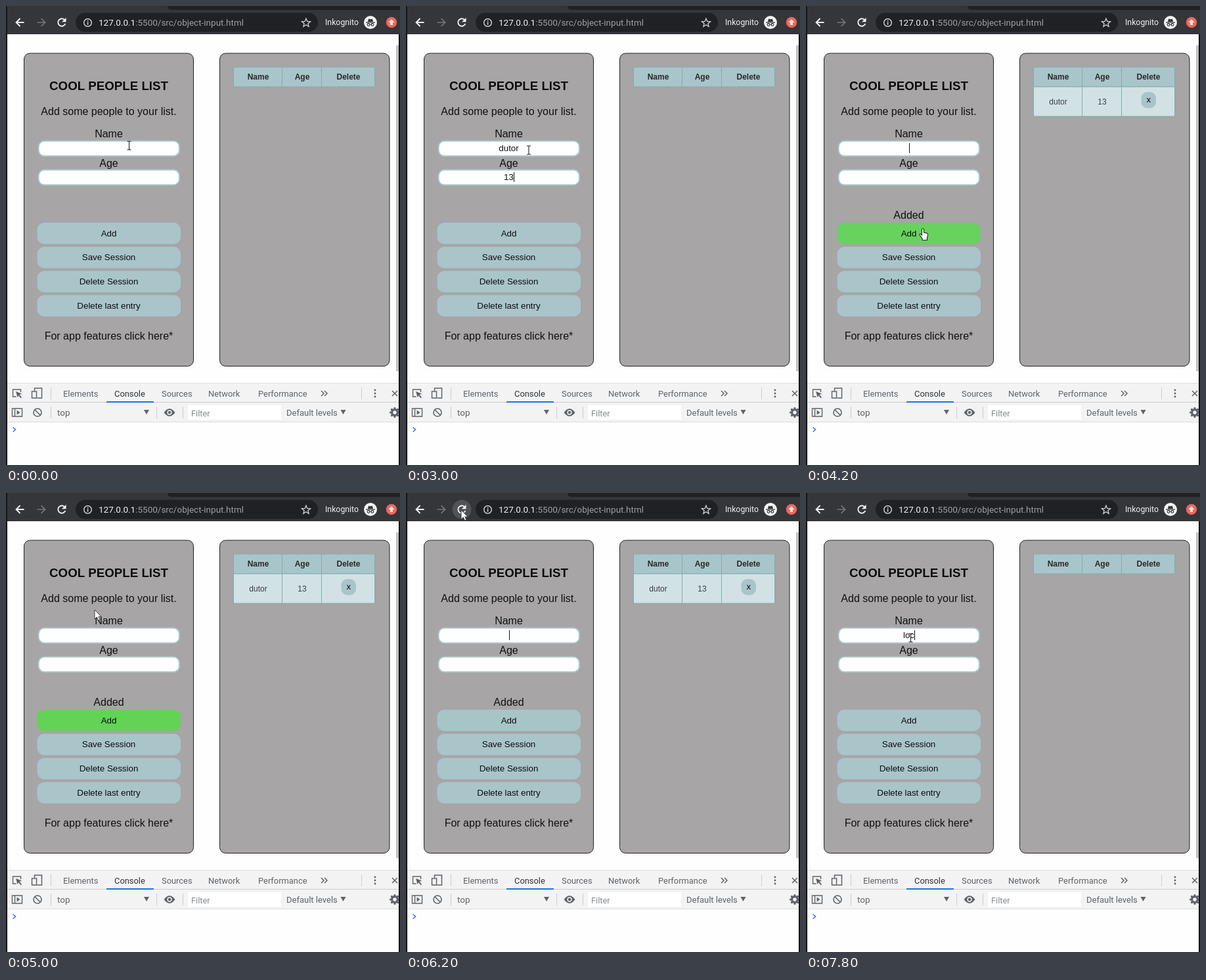
Recreate the animation shown at these times as an HTML page with a canvas. Size 600 by 699 pixels, loop 8 s.

```html
<!DOCTYPE html>
<html lang="en">
<head>
<meta charset="utf-8">
<title>Cool people list</title>
<style>
  html, body { margin: 0; width: 100%; height: 100%; overflow: hidden; background: #fefefe; }
  canvas { display: block; }
</style>
</head>
<body>
<canvas id="stage" width="600" height="699"></canvas>
<script>
const ctx = document.getElementById("stage").getContext("2d");
const LOOP = 8000, STEP = 200;
const PAGE = '"Liberation Sans", Arial, sans-serif';
const UI = "Roboto, sans-serif";
const TEAL = [169, 197, 202], GREEN = [76, 215, 50];
const PERSON = "dutor";
const ADD_AT = 4200, RELOAD_AT = 6600;
const HOVER_IN = 3400, HOVER_OUT = 4800, FADE = 1600;

// Input events: time, field, text after the event
const events = [
  [400, "name", ""],
  ...[...PERSON].map((c, i) => [800 + i * 200, "name", PERSON.slice(0, i + 1)]),
  [2400, "age", ""], [2600, "age", "1"], [2800, "age", "13"],
  [ADD_AT, "name", ""], [RELOAD_AT, "", ""], [7000, "name", ""],
  [7400, "name", "l"], [7600, "name", "lo"], [7800, "name", "loc"]
];

// Pointer path: time, x, y
const path = [
  [0, 187, 212], [2900, 187, 212], [3600, 178, 339], [4600, 178, 339],
  [5000, 135, 178], [5200, 126, 160], [6000, 84, 26], [6400, 84, 26],
  [6900, 159, 220], [LOOP, 159, 220]
];

const rgb = c => `rgb(${c.map(Math.round).join()})`;
const mix = (a, b, k) => a.map((v, i) => v + (b[i] - v) * k);
const clamp = v => Math.max(0, Math.min(1, v));
const easeOut = p => 1 - Math.pow(1 - clamp(p), 1.8);

function rect(x, y, w, h, fill) {
  ctx.fillStyle = fill;
  ctx.fillRect(x, y, w, h);
}

function box(x, y, w, h, r, fill, stroke, line = 1) {
  ctx.beginPath();
  ctx.roundRect(x, y, w, h, r);
  ctx.fillStyle = fill;
  ctx.fill();
  if (!stroke) return;
  ctx.strokeStyle = stroke;
  ctx.lineWidth = line;
  ctx.stroke();
}

function disc(x, y, r, fill) {
  ctx.beginPath();
  ctx.arc(x, y, r, 0, Math.PI * 2);
  ctx.fillStyle = fill;
  ctx.fill();
}

function ring(x, y, r, color, line, from = 0, to = Math.PI * 2) {
  ctx.beginPath();
  ctx.arc(x, y, r, from, to);
  ctx.strokeStyle = color;
  ctx.lineWidth = line;
  ctx.stroke();
}

function label(s, x, y, size, color = "#111", align = "center", family = PAGE, weight = "") {
  ctx.font = `${weight} ${size}px ${family}`;
  ctx.textAlign = align;
  ctx.fillStyle = color;
  ctx.fillText(s, x, y);
  return ctx.measureText(s).width;
}

const uiText = (s, x, y, size, color) => label(s, x, y, size, color, "left", UI);

function shape(d, x, y, fill, stroke, line = 1) {
  const p = new Path2D(d);
  ctx.save();
  ctx.translate(x, y);
  ctx.lineWidth = line;
  if (fill) { ctx.fillStyle = fill; ctx.fill(p); }
  if (stroke) { ctx.strokeStyle = stroke; ctx.stroke(p); }
  ctx.restore();
}

function pointerAt(t) {
  const i = path.findIndex((p, n) => n && t <= p[0]);
  const [t0, x0, y0] = path[i - 1], [t1, x1, y1] = path[i];
  const p = (t - t0) / (t1 - t0), k = p * p * (3 - 2 * p);
  return [x0 + (x1 - x0) * k, y0 + (y1 - y0) * k];
}

function formAt(t) {
  const form = { name: "", age: "", focus: "", caret: false };
  for (const [at, field, text] of events) {
    if (at > t) break;
    if (at === ADD_AT || at === RELOAD_AT) form.name = form.age = "";
    if (field) form[field] = text;
    form.focus = field;
    form.caret = field !== "" && (t - at) % 1000 < 500;
  }
  return form;
}

function drawToolbar(reloadHover) {
  rect(0, 0, 600, 43, "#35363a");
  box(246, -8, 360, 14, 6, "#202124");
  if (reloadHover) disc(85, 25, 14.5, "#515256");
  box(106, 10.5, 369, 29, 14.5, "#202124");
  shape("M6 -6L0 0L6 6M0 0H12", 15.5, 25, null, "#f1f1f1", 1.9);
  shape("M-6 -6L0 0L-6 6M0 0H-12", 59.5, 25, null, "#77787b", 1.7);
  ring(85, 25, 5.7, "#f1f1f1", 1.9, 0.35, 5.5);
  shape("M0 0V-6.5L-6.5 0Z", 91.5, 24.2, "#f1f1f1");
  ring(124.5, 25.3, 5.8, "#d5d6d8", 1.4);
  rect(123.8, 24.4, 1.5, 4.3, "#d5d6d8");
  rect(123.8, 21.8, 1.5, 1.5, "#d5d6d8");
  const w = uiText("127.0.0.1", 141, 30, 13.5, "#f1f2f3");
  uiText(":5500/src/object-input.html", 141 + w, 30, 13.5, "#9aa0a6");
  shape("M0 -6.5L1.8 -2.1L6.5 -1.8L2.9 1.2L4.1 5.8L0 3.3L-4.1 5.8L-2.9 1.2L-6.5 -1.8L-1.8 -2.1Z",
    457, 25.5, null, "#d5d6d8", 1.3);
  uiText("Inkognito", 486, 29, 12.3, "#f1f2f3");
  disc(555, 25, 10, "#f3f3f4");
  shape("M-7 -0.5H7V0.8H-7ZM-4.2 -1L-2.8 -5.5L0 -4.8L2.8 -5.5L4.2 -1Z", 555, 25, "#35363a");
  for (const x of [552, 558]) ring(x, 28.5, 1.8, "#35363a", 1.2);
  rect(554, 27.8, 2, 1, "#35363a");
  disc(587, 25, 8.2, "#ee675c");
  shape("M0 -5L4.6 0H2V4H-2V0H-4.6Z", 587, 25, "#fbe3e0");
}

function drawForm(t, form) {
  box(27.5, 72, 258, 476.5, 9, "#a7a5a6", "#232323");
  label("COOL PEOPLE LIST", 156.5, 128, 18.72, "#0c0c0c", "center", PAGE, "bold");
  label("Add some people to your list.", 156.5, 165.5, 16);
  label("Name", 156.5, 199.5, 16);
  label("Age", 156.5, 244.5, 16);

  [["name", 205.5], ["age", 249.5]].forEach(([field, y]) => {
    box(49.5, y, 214.5, 23, 9, "#fff", rgb(TEAL), 2);
    const w = label(form[field], 156.5, y + 15, 13.33);
    if (form.caret && form.focus === field) rect(Math.round(156.5 + w / 2), y + 3.5, 1, 15, "#111");
  });

  if (t >= ADD_AT && t < RELOAD_AT) label("Added", 156.5, 323.5, 16);
  const heat = easeOut((Math.min(t, HOVER_OUT) - HOVER_IN) / FADE) * (1 - easeOut((t - HOVER_OUT) / FADE));
  ["Add", "Save Session", "Delete Session", "Delete last entry"].forEach((s, i) => {
    const y = 330 + i * 36.75;
    box(47.5, y, 218.5, 32.5, 11, rgb(i ? TEAL : mix(TEAL, GREEN, heat)));
    label(s, 156.5, y + 20.5, 13.33, "#0c0c0c");
  });
  label("For app features click here*", 156.5, 507.5, 16);
}

function drawTable(filled) {
  box(325.5, 72, 258.5, 476.5, 9, "#a7a5a6", "#232323");
  const cells = [[346.5, 74, "Name", PERSON], [420.5, 60, "Age", "13"], [480.5, 81, "Delete", ""]];
  for (const [x, w, head, value] of cells) {
    box(x, 93, w, 30, 0, rgb(TEAL), "#7eadb3");
    label(head, x + w / 2 + 0.5, 112, 12, "#26292b", "center", PAGE, "bold");
    if (!filled) continue;
    box(x, 123, w, 45, 0, "#d2e2e4", "#7eadb3");
    label(value, x + w / 2 + 0.5, 149.5, 12, "#3c3f41");
  }
  if (!filled) return;
  box(510.5, 131, 22.5, 24.5, 9, rgb(TEAL));
  label("x", 521.8, 147, 13.33, "#0c0c0c");
}

function drawDevtools() {
  const grey = "#5f6368", line = "#cacdd1";
  rect(0, 574, 600, 59, "#f3f3f3");
  rect(0, 574, 600, 1, "#dadce0");
  rect(0, 603, 600, 1, line);
  rect(0, 633, 600, 1, "#dcdcdc");
  rect(153, 602, 72, 2, "#1a73e8");
  rect(277, 608, 142, 22, "#fff");

  shape("M5 11H0V0H12V4", 10.5, 584, null, grey, 1.4);
  shape("M0 0L9 3.5L5.5 5L9 9L7.5 10.2L4 6.3L2.5 9Z", 15, 587, grey);
  shape("M4 4V0H15V15H8M0 5H7V15H0Z", 39.5, 582, null, grey, 1.5);
  for (const x of [68, 541]) rect(x, 581, 1, 18, line);
  [["Elements", 87], ["Console", 165], ["Sources", 237], ["Network", 308], ["Performance", 384]]
    .forEach(([s, x]) => uiText(s, x, 594.5, 12.9, s === "Console" ? "#303236" : grey));
  shape("M0 -4L4 0L0 4M5 -4L9 0L5 4", 480, 590, null, grey, 1.5);
  for (const y of [585, 590, 595]) disc(562, y, 1.4, grey);
  shape("M-4 -4L4 4M4 -4L-4 4", 592, 590, null, grey, 1.5);

  shape("M0 0H15V12H0ZM4 0V12", 9.5, 613, null, grey, 1.4);
  shape("M0 0L5 3.5L0 7Z", 16.5, 615.5, grey);
  ring(48, 619, 6, grey, 1.6);
  shape("M-4 -4L4 4", 48, 619, null, grey, 1.6);
  for (const x of [68, 229, 269]) rect(x, 610, 1, 18, line);
  uiText("top", 78, 624, 13.4, grey);
  for (const x of [214, 513.5]) shape("M-4 -3.5H4L0 3.5Z", x, 618.5, grey);
  shape("M-8.5 0Q0 -11.5 8.5 0Q0 11.5 -8.5 0Z", 249, 619, grey);
  disc(249, 619, 3.7, "#f3f3f3");
  disc(249, 619, 2.2, grey);
  uiText("Filter", 282, 624.5, 12.8, "#85888c");
  uiText("Default levels", 427, 624, 13, grey);

  ring(592, 619, 4.4, grey, 3.4);
  for (let i = 0; i < 8; i++) {
    const a = i * Math.PI / 4;
    disc(592 + 6.4 * Math.cos(a), 619 + 6.4 * Math.sin(a), 1.6, grey);
  }
  shape("M0 0L4 3.5L0 7", 10.5, 641.5, null, "#4673d9", 1.6);
}

function drawPointer(x, y) {
  const inside = (left, top, w, h) => x >= left && x <= left + w && y >= top && y <= top + h;
  if (inside(49, 205, 215, 24) || inside(49, 249, 215, 24)) {
    shape("M-3 -6.5H-1L0 -5.5L1 -6.5H3M0 -5.5V5.5M-3 6.5H-1L0 5.5L1 6.5H3", x + 0.5, y + 0.5, null, "#222", 1.1);
  } else if (inside(47.5, 330, 218.5, 32.5)) {
    shape("M-1.5 1Q0 -1.5 1.5 1V6L6 7Q8 7.5 7.5 10L6.5 14V17.5H-1V15L-5 9.5Q-5 7 -2.8 8.5L-1.5 10Z",
      x, y, "#fff", "#222", 1.1);
  } else {
    shape("M0 0V14L3.3 11L5.6 16L8 15L5.8 10.2H10Z", x, y, "#fff", "#333", 0.9);
  }
}

function draw(t) {
  const [x, y] = pointerAt(t);
  rect(0, 0, 600, 699, "#fefefe");
  drawToolbar(Math.hypot(x - 85, y - 25) < 15);
  drawForm(t, formAt(t));
  drawTable(t >= ADD_AT && t < RELOAD_AT);
  rect(594, 60, 4, 496, "#c3c3c3");
  drawDevtools();
  rect(0, 0, 2, 699, "#171717");
  rect(598, 43, 2, 699, "#171717");
  drawPointer(x, y);
}

function tick() {
  draw(Math.floor((performance.now() % LOOP) / STEP) * STEP);
  requestAnimationFrame(tick);
}
tick();
</script>
</body>
</html>
```
